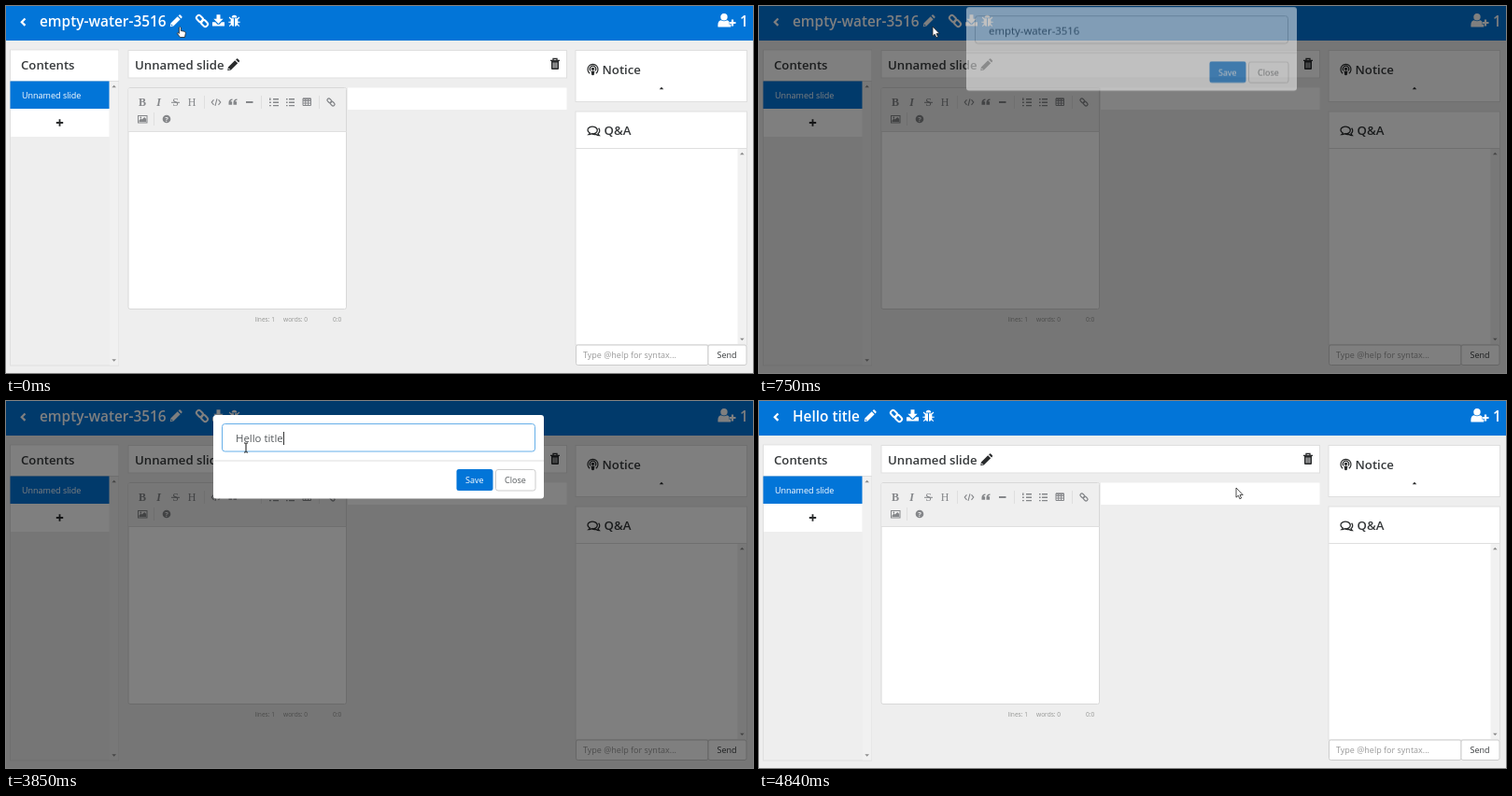
An HTML page that plays this animation: 800x393 px, repeating every 5.39 s.

```html
<!DOCTYPE html>
<html lang="en">
<head>
<meta charset="utf-8">
<title>Rename a room</title>
<style>
html, body { margin: 0; height: 100%; overflow: hidden; background: #eee; }
svg { display: block; width: 100vw; height: 100vh; font: 9px "Open Sans", "Noto Sans", sans-serif; }
text { white-space: pre; }
.title { font-size: 15.4px; font-weight: 600; fill: #fff; }
.head { font-size: 13.2px; font-weight: 600; fill: #373a3c; }
.field { font-size: 11.4px; fill: #55595c; }
.tiny { font-size: 6.6px; fill: #959694; }
.serif { font: bold 12px "Liberation Serif", serif; fill: #85878a; text-anchor: middle; }
.thin { font-weight: 400; }
.italic { font-style: italic; }
.card { fill: #fff; stroke: #dfdfdf; }
.rule { fill: none; stroke: #dfdfdf; }
.track { fill: #f1f1f1; }
.white { color: #fff; }
.dark { color: #292b2c; }
.grey { color: #85878a; }
.ico { fill: currentColor; }
.line { fill: none; stroke: currentColor; }

.anim { animation: 5390ms linear infinite; }
.step { animation: 5390ms step-end infinite; }
.backdrop { animation-name: dim; }
.fade { animation-name: fade; }
.slide { animation-name: slide; }
.before { animation-name: before; }
.after { animation-name: after; }
.icons { animation-name: icons; }
.input { animation-name: focus; }
.save { animation-name: hover; }
.stale { animation-name: stale; }
.select { animation-name: select; }
.pointer { animation-name: travel; }
.hand { animation-name: hand; }
.arrow { animation-name: arrow; }
.beam { animation-name: beam; }

@keyframes dim { 0%, 11.31% { opacity: 0 } 11.317% { opacity: .11 } 13.5%, 86.73% { opacity: .5 } 89.52%, 100% { opacity: 0 } }
@keyframes fade { 0%, 12.52% { opacity: 0 } 15.31%, 83.95% { opacity: 1 } 86.73%, 100% { opacity: 0 } }
@keyframes slide {
  0%, 12.52% { transform: translateY(-22.4px); animation-timing-function: ease-out }
  18.09% { transform: none }
  83.95% { transform: none; animation-timing-function: ease-out }
  89.52%, 100% { transform: translateY(-22.4px) }
}
@keyframes before { 0% { opacity: 1 } 82.75%, 100% { opacity: 0 } }
@keyframes after { 0% { opacity: 0 } 82.75%, 100% { opacity: 1 } }
@keyframes icons { 0% { transform: none } 82.75%, 100% { transform: translateX(-63px) } }
@keyframes focus { 0% { stroke: #ccc } 25.23% { stroke: #66afe9 } 82.75%, 100% { stroke: #ccc } }
@keyframes hover { 0% { fill: #0275d8 } 77.18%, 100% { fill: #025aa5 } }
@keyframes stale { 0% { opacity: 1 } 39.7%, 100% { opacity: 0 } }
@keyframes select { 0%, 25.23% { clip-path: inset(0 0 0 100%) } 27.07%, 100% { clip-path: inset(0 0 0 0) } }
@keyframes travel {
  0%, 15.4% { transform: translate(186px, 22px); animation-timing-function: ease-in-out }
  20.96%, 22.62% { transform: translate(389px, 68px) }
  22.63%, 25.22% { transform: translate(389px, 55px) }
  25.23% { transform: translate(345px, 42px) }
  28%, 71.42% { transform: translate(195px, 42px) }
  71.43%, 72.5% { transform: translate(257px, 50px); animation-timing-function: ease-in-out }
  78.48%, 100% { transform: translate(511px, 93px) }
}
@keyframes hand { 0% { opacity: 1 } 11.317% { opacity: 0 } 77.18% { opacity: 1 } 86.73%, 100% { opacity: 0 } }
@keyframes arrow { 0% { opacity: 0 } 11.317% { opacity: 1 } 25.23% { opacity: 0 } 72.73% { opacity: 1 } 77.18% { opacity: 0 } 86.73%, 100% { opacity: 1 } }
@keyframes beam { 0% { opacity: 0 } 25.23% { opacity: 1 } 29.5% { opacity: 0 } 71.43% { opacity: 1 } 72.73%, 100% { opacity: 0 } }
</style>
</head>
<body>
<svg viewBox="0 0 800 393" preserveAspectRatio="none">
  <defs>
    <path id="pencil" class="ico" fill-rule="evenodd" d="M-6.2 6.2L-5.6 2.6 1.7-4.7 4.7-1.7-2.6 5.6zM2.6-5.6L3.5-6.4q.6-.5 1.2 0L6.4-4.7q.5.6 0 1.2L5.6-2.6zM-4.9 3.4L-5.2 4.8-4.8 5.2-3.4 4.9z"/>
    <g id="link" class="line" stroke-width="2" transform="rotate(45)">
      <rect x="-7.4" y="-2.6" width="7.8" height="5.2" rx="2.4"/>
      <rect x="-.4" y="-2.6" width="7.8" height="5.2" rx="2.4"/>
    </g>
    <path id="download" class="ico" d="M-2-6.2h4v4.4h3.2L0 3.4-5.2-1.8H-2zM-6.5 1.8h3.2L-1 4.2h2l2.3-2.4h3.2V6h-13z"/>
    <g id="bug">
      <path class="ico" d="M-2.8-3.6a2.8 2.7 0 0 1 5.6 0zM-3.6-2.8h3.1v8.6c-2.2 0-3.5-1.8-3.5-4.3zM3.6-2.8H.5v8.6c2.2 0 3.5-1.8 3.5-4.3z"/>
      <path class="line" stroke-width="1.1" d="M-3.5-2L-5.4-4M3.5-2L5.4-4M-3.5 1.2h-2.7M3.5 1.2h2.7M-3.3 3.6l-2 2.1M3.3 3.6l2 2.1"/>
    </g>
    <path id="up" d="M-2.3 1.2L0-1.3 2.3 1.2z"/>
    <path id="down" d="M-2.3-1.2L0 1.3 2.3-1.2z"/>
    <path id="quote" class="ico" d="M-.5-3.5q-4 .3-4 4v2.3h3.6v-3.6h-1.7q.1-1.3 2.1-1.5z"/>
  </defs>

  <rect width="800" height="393" fill="#eee"/>

  <!-- Top bar -->
  <rect width="800" height="37" fill="#0275d8"/>
  <g class="white">
    <path class="line" stroke-width="2.2" d="M20.5 13.5L16.8 17.2 20.5 20.9"/>
    <text class="title step before" x="36" y="21.5">empty-water-3516</text>
    <text class="title step after" x="36" y="21.5">Hello title</text>
    <g class="step icons">
      <use href="#pencil" x="182" y="16"/>
      <g transform="translate(210 16)"><use href="#link"/></g>
      <use href="#download" x="227.5" y="15.5"/>
      <use href="#bug" x="244.5" y="16"/>
    </g>
    <circle class="ico" cx="769" cy="11.8" r="3.7"/>
    <path class="ico" d="M762.5 22.5c-.6-4 .8-7 3.2-7.2q3.3 2 6.6 0 1.3.2 2 1.3v3h2v2.9z"/>
    <path class="line" stroke-width="2.2" d="M774.5 18h7M778 14.5v7"/>
    <text class="title" x="786" y="21.5">1</text>
  </g>

  <!-- Contents -->
  <rect class="rule" x="4.5" y="47" width="116" height="338"/>
  <rect x="5" y="47.5" width="115.5" height="32.5" fill="#fff"/>
  <path class="rule" d="M5 80.5h115.500"/>
  <text class="head" x="16" y="68">Contents</text>
  <rect class="track" x="111" y="81" width="9.5" height="303.5"/>
  <rect x="4.5" y="80.5" width="106" height="29.5" fill="#0275d8"/>
  <text x="17" y="98.7" fill="#fff">Unnamed slide</text>
  <path fill="#fff" d="M5 110h105.500v30H5z"/>
  <path d="M53.8 125h7.4M57.5 121.3v7.4" stroke="#292b2c" stroke-width="1.8"/>
  <g fill="#8c8c8c"><use href="#up" x="115.7" y="86"/><use href="#down" x="115.7" y="379.5"/></g>

  <!-- Slide heading -->
  <rect class="card" x="131" y="47.5" width="469.5" height="29.5"/>
  <text class="head" x="138" y="68">Unnamed slide</text>
  <g class="dark">
    <use href="#pencil" x="243.5" y="63"/>
    <path class="line" stroke-width="1.3" d="M583 58.3h10M586 58v-1.6h4V58"/>
    <path class="ico" fill-rule="evenodd" d="M584 59h8v8q0 1-1 1h-6q-1 0-1-1zM585.7 60.5v6h.8v-6zM587.6 60.5v6h.8v-6zM589.5 60.5v6h.8v-6z"/>
  </g>

  <!-- Editor -->
  <rect x="366" y="87.5" width="234.5" height="23.5" fill="#fff"/>
  <rect x="131" y="87.5" width="233.5" height="237" rx="2" fill="#fff" stroke="#d8d8d8"/>
  <path d="M131.5 88h232.5v46.5H131.5z" fill="#efefef"/>
  <path class="rule" d="M131 134.5h233.5M212.5 96v14M273.5 96v14M335.5 96v14M158.5 114v14"/>
  <text class="serif" x="146" y="107">B</text>
  <text class="serif italic" x="163.5" y="107">I</text>
  <text class="serif thin" x="181.5" y="107">S</text>
  <text class="serif thin" x="199" y="107">H</text>
  <g class="grey">
    <path class="line" d="M177 103.3h9"/>
    <path class="line" stroke-width="1.1" d="M222.5 100.3l-2.3 2.8 2.3 2.8M227.5 100.3l2.3 2.8-2.3 2.8M226 99.3l-2 7.6"/>
    <use href="#quote" x="243" y="103"/><use href="#quote" x="248" y="103"/>
    <path class="line" stroke-width="2" d="M257 103h7.5"/>
    <path class="line" stroke-width="1.4" d="M286 99.8h6M286 103.2h6M286 106.6h6M303 99.8h6M303 103.2h6M303 106.6h6M282.8 98.5v2.5M282 103.2h1.8M282 106.6h1.8M300 99.8h1.6M300 103.2h1.6M300 106.6h1.6"/>
    <path class="line" d="M318 99h8.5v7.5H318zM318 101.5h8.5M318 104h8.5M320.8 99v7.5M323.7 99v7.5"/>
    <path class="line" stroke-width="1.6" d="M318 99.5h8.5"/>
    <g transform="translate(348 103) scale(.66)"><use href="#link"/></g>
    <rect class="line" x="141.5" y="117.5" width="9.5" height="7.5"/>
    <path class="ico" d="M142.5 124v-1.6l2-2 1.2 1.2 2.5-2.5 2 2V124z"/>
    <circle class="ico" cx="144.3" cy="119.5" r=".9"/>
    <circle class="ico" cx="172" cy="121" r="4.3"/>
  </g>
  <text x="172" y="123.7" fill="#efefef" text-anchor="middle" font-size="7.5" font-weight="700">?</text>
  <text class="tiny" x="266.5" y="337.5">lines: 1</text>
  <text class="tiny" x="297" y="337.5">words: 0</text>
  <text class="tiny" x="350" y="337.5">0:0</text>

  <!-- Notice -->
  <rect class="card" x="610" y="47.5" width="183.5" height="55"/>
  <text class="head" x="638.5" y="73">Notice</text>
  <g class="dark">
    <path class="line" stroke-width="1.2" d="M625.2 72.3a5.5 5.5 0 1 1 6.6 0M626 69.5a3.2 3.2 0 1 1 5 0"/>
    <circle class="ico" cx="628.5" cy="67.3" r="1.6"/>
    <path class="ico" d="M626.6 69.8q1.9-.8 3.8 0l-.6 4q-1.3.9-2.6 0z"/>
    <use class="ico" href="#up" x="702" y="88"/>
  </g>

  <!-- Chat -->
  <rect class="card" x="610" y="113" width="183.5" height="250"/>
  <path class="rule" d="M610 152.5h183.5"/>
  <rect class="track" x="783.5" y="153" width="9.5" height="209"/>
  <g fill="#8c8c8c"><use href="#up" x="788.3" y="158"/><use href="#down" x="788.3" y="357"/></g>
  <text class="head" x="640.5" y="138">Q&amp;A</text>
  <g class="dark line" stroke-width="1.3">
    <path d="M624.2 137.6q.9-.7 1.1-1.6c-3-1.4-3.1-4.8-.3-6.2 3.800-1.800 8.300.2 8.300 3.300 0 2.700-3.200 4.100-6.100 3.600q-1.300.8-3 .9z"/>
    <path d="M634.600 130.800c1.800 1.800 1.400 4.600-.6 5.900q.2 1 1.200 1.900-2 0-3.200-1.100-2.400.5-4.300-.5"/>
  </g>
  <rect x="610.5" y="363" width="141.5" height="21.5" rx="2" fill="#fff" stroke="#ccc"/>
  <rect x="752" y="363" width="41" height="21.5" rx="2" fill="#fff" stroke="#ccc"/>
  <text x="618" y="377" fill="#999">Type @help for syntax...</text>
  <text x="761.5" y="377" fill="#373a3c">Send</text>

  <rect class="anim backdrop" width="800" height="393"/>

  <!-- Dialog -->
  <g class="anim fade"><g class="anim slide">
    <rect x="222" y="15" width="354" height="89.5" rx="3" fill="#fff"/>
    <rect class="step input" x="231.5" y="24.5" width="335" height="29.5" rx="3" fill="#fff"/>
    <path d="M222 64h354" stroke="#ddd"/>
    <g class="step stale">
      <text class="field" x="246" y="44">empty-water-3516</text>
      <g class="anim select">
        <rect x="246" y="32" width="97" height="15" fill="#3390ff"/>
        <text class="field" x="246" y="44" style="fill:#fff">empty-water-3516</text>
      </g>
    </g>
    <text class="field" id="typed" x="246" y="44"></text>
    <path id="caret" d="M.5 33v14" stroke="#333" opacity="0"/>
    <rect class="step save" x="482.5" y="73" width="39" height="23" rx="2.5"/>
    <text x="492" y="88" fill="#fff">Save</text>
    <rect x="524.5" y="73.5" width="42.5" height="22.5" rx="2.5" fill="#fff" stroke="#ccc"/>
    <text x="534" y="88" fill="#55595c">Close</text>
  </g></g>

  <!-- Pointer, with its hot spot at the origin -->
  <g class="anim pointer" stroke-linejoin="round">
    <path class="step arrow" d="M0 0v10.2l2.3-2 1.6 3.6 1.7-.8-1.6-3.4h3.2z" fill="#fff" stroke="#222" stroke-width=".8"/>
    <path class="step hand" d="M-.6 1q1-1.5 1.9 0v3.5l4 .8q1.2.4 1 2l-.8 4.2h-5l-3.300-4.300q.3-1.400 2.200.2z" fill="#fff" stroke="#222" stroke-width=".8"/>
    <path class="step beam" d="M-2-5h1.5l.5.5.5-.5H2M0-4.5v9M-2 5h1.5l.5-.5.5.5H2" fill="none" stroke="#111"/>
  </g>
</svg>
<script>
const LOOP = 5390;
const CARET_OFF = 3990;
const word = "Hello title";
const keyTimes = [2140, 2290, 2450, 2620, 2710, 2800, 3070, 3220, 3300, 3380, 3460];
const typed = document.getElementById("typed");
const caret = document.getElementById("caret");
const timing = { duration: LOOP, iterations: Infinity };
const at = (ms, props) => ({ offset: ms / LOOP, easing: "step-end", ...props });

const letters = [...word].map(char => {
  const span = document.createElementNS("http://www.w3.org/2000/svg", "tspan");
  span.textContent = char;
  typed.append(span);
  return span;
});

letters.forEach((span, i) => span.animate([
  at(0, { fillOpacity: 0 }),
  at(keyTimes[i], { fillOpacity: 1 }),
  at(LOOP, { fillOpacity: 1 })
], timing));

const caretAfter = i => `translateX(${Math.round(typed.getEndPositionOfChar(i).x)}px)`;
const last = caretAfter(word.length - 1);
caret.animate([
  at(0, { opacity: 0, transform: "translateX(246px)" }),
  ...keyTimes.map((ms, i) => at(ms, { opacity: 1, transform: caretAfter(i) })),
  at(CARET_OFF, { opacity: 0, transform: last }),
  at(LOOP, { opacity: 0, transform: last })
], timing);
</script>
</body>
</html>
```
